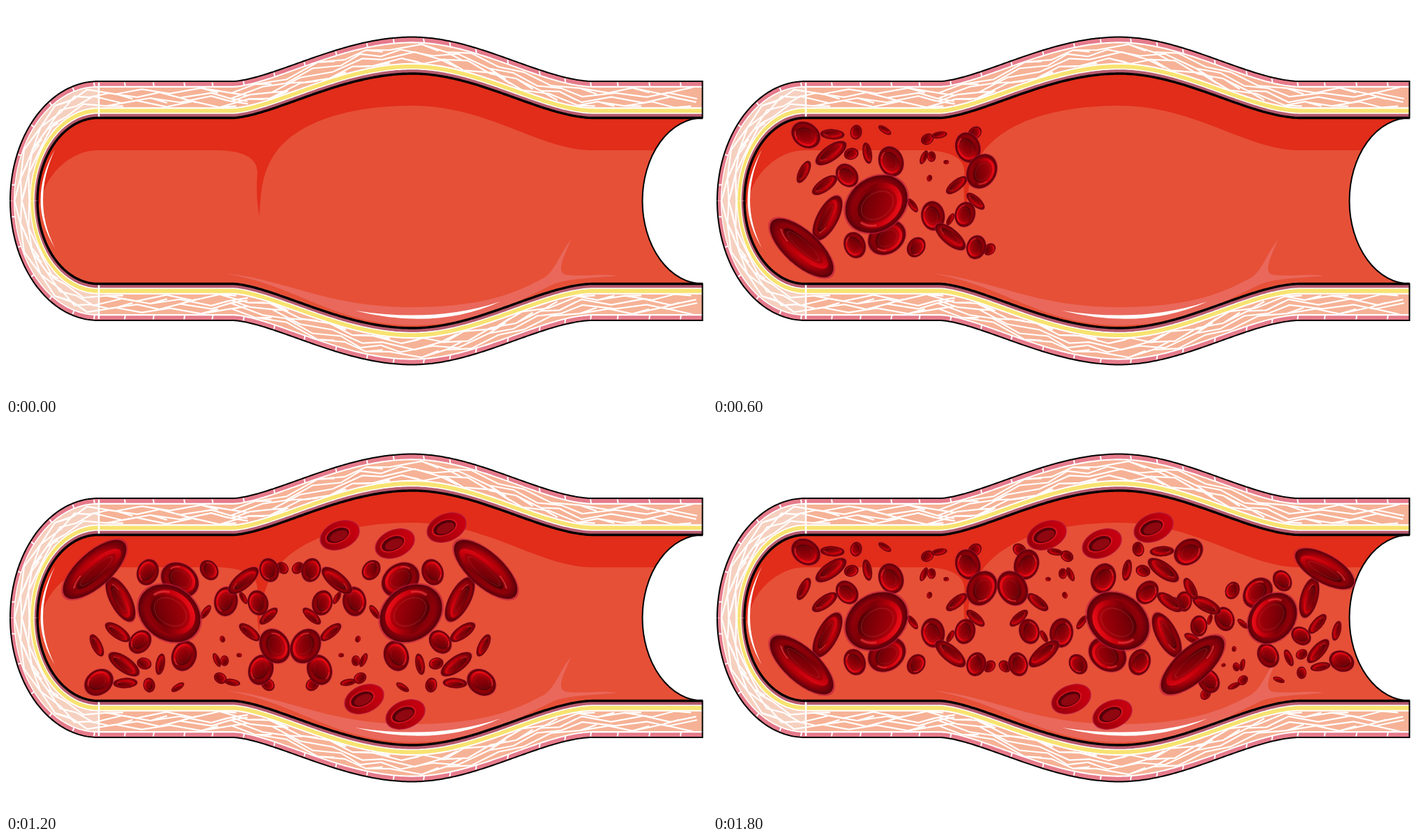
Write an HTML page with a canvas that moves like this. It is 1004 px wide and 558 px high and loops after 2400 ms.

```html
<!DOCTYPE html>
<html lang="en">
<head>
<meta charset="utf-8">
<title>Blood vessel</title>
<style>
html, body { margin: 0; width: 100%; height: 100%; overflow: hidden; background: #fff; }
canvas { display: block; }
</style>
</head>
<body>
<canvas id="stage" width="1004" height="558"></canvas>
<script>
const ctx = document.getElementById("stage").getContext("2d");
const TAU = Math.PI * 2, MID = 279.5, CAP = -103, END = 998;

let seed = 7;
const rnd = () => (seed = seed * 16807 % 2147483647) / 2147483647;

// --- vessel wall: s runs along the upper half, k from outside (0) to inside (1)
function bulge(x) {
  let u = x < 582 ? (x - 325) / 257 : (840 - x) / 258;
  if (u <= 0) return 0;
  u = Math.pow(u, x < 582 ? 0.81 : 0.9);
  return u * u * (3 - 2 * u);
}

function pt(s, k) {
  if (s >= 132) return [s, 108 + 52.5 * k - 63.5 * bulge(s)];
  const a = (132 - s) / (132 - CAP) * Math.PI / 2;
  return [132 - (126 - 39 * k) * Math.sin(a), MID - (171.5 - 52.5 * k) * Math.cos(a)];
}

function trace(k, from, to) {
  const step = from < to ? 3 : -3;
  for (let s = from; (to - s) * step > 0; s += step) ctx.lineTo(...pt(s, k));
  ctx.lineTo(...pt(to, k));
}

function band(k0, k1, color, from = CAP, to = END) {
  ctx.beginPath();
  trace(k0, from, to);
  trace(k1, to, from);
  ctx.fillStyle = color;
  ctx.fill();
}

function line(width, color, points) {
  ctx.beginPath();
  points();
  ctx.lineWidth = width;
  ctx.strokeStyle = color;
  ctx.stroke();
}

function fibres() {
  for (let j = 0; j < 4; j++) {
    line(2.2, "#fff", () => {
      let n = j;
      for (let s = CAP; s < END; s += 27 + rnd() * 20) {
        const k = 0.26 + j * 0.12 + (n++ % 2 ? 0.07 : -0.07) + (rnd() - 0.5) * 0.06;
        ctx.lineTo(...pt(s, k));
        if (rnd() < 0.4) {
          const end = pt(s + 24, Math.min(0.68, k + 0.13));
          ctx.lineTo(...end);
          ctx.moveTo(...pt(s, k));
        }
      }
    });
  }
  for (let s = CAP + 20; s < END; s += 36 + rnd() * 10)
    line(2, "#fff", () => { ctx.moveTo(...pt(s, 0.03)); ctx.lineTo(...pt(s + 1, 0.14)); });
}

function halfWall() {
  seed = 7;
  band(0, 1, "#fff");
  band(0, 0.13, "#e57b8b");
  band(0.17, 0.71, "#f6b296");
  band(0.17, 0.71, "#f6d0bf", CAP, 132);
  band(0.75, 0.86, "#f8e371");
  band(0.89, 1, "#b75a6e");
  fibres();
  line(2.5, "#fff", () => { ctx.moveTo(133, 110); ctx.lineTo(133, 159); });
  line(2, "#000", () => trace(0, CAP, END));
  line(3.4, "#000", () => trace(1, CAP, END));
  line(2, "#000", () => { ctx.moveTo(997.5, 107); ctx.lineTo(997.5, 161); });
}

function mirrored(draw) {
  draw();
  ctx.save();
  ctx.transform(1, 0, 0, -1, 0, 2 * MID);
  draw();
  ctx.restore();
}

function fillPath(d, color) {
  ctx.fillStyle = color;
  ctx.fill(new Path2D(d));
}

function vessel() {
  ctx.fillStyle = "#fff";
  ctx.fillRect(0, 0, 1004, 558);
  ctx.save();
  ctx.beginPath();
  trace(1, CAP, END);
  ctx.ellipse(END, MID, 86.5, 119, 0, -Math.PI / 2, Math.PI / 2, true);
  for (let s = END; s >= CAP; s -= 3) {
    const [x, y] = pt(s, 1);
    ctx.lineTo(x, 2 * MID - y);
  }
  ctx.clip();
  ctx.fillStyle = "#e65037";
  ctx.fillRect(0, 0, 1004, 558);
  fillPath("M40 300L52 275C58 240 95 207 130 207H300C340 207 361 218 360 240C358 268 360 285 363 301C365 270 365 242 385 212C420 162 500 143 582 143C690 143 765 207 840 207H1000V80H40Z", "#e12d1a");
  fillPath("M316 384C400 392 460 432 580 432C690 432 735 409 772 389C789 376 794 353 809 336C798 361 786 385 805 386C830 388 850 384 875 387C830 391 800 391 780 401C715 433 670 457 582 458C470 457 420 402 316 384Z", "#e9685b");
  fillPath("M500 437Q615 466 708 424Q615 455 500 437Z", "#fff");
  fillPath("M70 206Q29 280 70 347Q36 280 70 206Z", "#fff");
  ctx.restore();
  mirrored(halfWall);
  line(2, "#000", () => ctx.ellipse(END, MID, 86.5, 119, 0, Math.PI / 2, Math.PI * 1.5));
}

// --- blood cells: x, y, radius, angle in degrees
const round = [
  [133,185,23,35], [192,243,19,50], [255,223,23,70], [234,284,50,-35], [249,332,30,-35],
  [203,343,20,70], [291,346,16,-55], [315,301,22,82], [361,299,19,105], [385,237,27,-60],
  [365,203,23,70], [375,182,11,-40], [377,346,18,105], [396,349,10,-45], [307,191,10,-30],
  [313,216,8,90], [334,224,4,0], [310,247,5,110], [205,181,11,100], [198,212,11,-15]
];
const thin = [
  [171,184,18,3], [246,178,11,33], [169,211,27,-35], [221,211,16,80], [130,238,18,-63],
  [160,257,22,-35], [164,304,37,-62], [127,347,60,42], [286,286,12,55], [340,331,28,40],
  [340,306,10,-60], [376,280,17,42], [349,257,19,-38], [324,185,12,-10], [302,217,11,115]
];
const loose = [[478,161], [557,173], [631,150], [513,396], [572,418]];
const cells = [...round.map(c => [...c, 0.8]), ...thin.map(c => [...c, 0.43])]
  .sort((a, b) => a[2] - b[2]);

function disc(x, y, rx, ry, fill) {
  ctx.beginPath();
  ctx.ellipse(x, y, rx, ry, 0, 0, TAU);
  ctx.fillStyle = fill;
  ctx.fill();
}

function shade(gradient, ...colors) {
  colors.forEach((c, i) => gradient.addColorStop(i / (colors.length - 1), c));
  return gradient;
}

function place(x, y, r, deg, ratio, draw) {
  ctx.save();
  ctx.translate(x, y);
  ctx.rotate(deg * Math.PI / 180);
  ctx.scale(r, r * ratio);
  draw();
  ctx.restore();
}

function cell([x, y, r, deg, ratio]) {
  const flat = ratio < 0.5;
  place(x, y, r, deg, ratio, () => {
    disc(0, 0, 1, 1, "rgba(185,25,60,.6)");
    disc(0, 0, 0.95, 0.95, shade(ctx.createRadialGradient(0, 0, 0.4, 0, 0, 0.95),
      "#b80009", "#b00009", "#84000a", "#57000a"));
    const cy = flat ? -0.14 : 0.06;
    disc(0, cy, 0.76, flat ? 0.58 : 0.74, shade(ctx.createLinearGradient(-0.6, -0.6, 0.5, 0.7),
      "#950009", "#7b0007", "#c5000c", "#ee1019"));
    disc(0, cy, 0.61, flat ? 0.36 : 0.57, shade(ctx.createLinearGradient(-0.5, -0.4, 0.5, 0.5),
      "#480006", "#8e0009", "#b8000b"));
    disc(0, cy + 0.03, 0.46, flat ? 0.2 : 0.4, shade(ctx.createLinearGradient(-0.4, -0.4, 0.4, 0.4),
      "#650006", "#a50009"));
    if (r > 14) {
      line(0.018, "rgba(180,65,55,.55)", () => ctx.ellipse(0, cy, 0.5, flat ? 0.26 : 0.44, 0, 0, TAU));
      line(0.07, "rgba(255,70,75,.55)", () => ctx.ellipse(0, cy, 0.69, flat ? 0.47 : 0.66, 0, 2.1, 2.9));
    }
  });
}

function looseCell([x, y]) {
  place(x, y, 30, -23, 0.67, () => {
    disc(0, 0, 1, 1, "#b51737");
    disc(0, 0, 0.95, 0.95, shade(ctx.createLinearGradient(-0.9, 0, 0.9, 0),
      "#98000d", "#b2000d", "#c90010"));
    disc(-0.09, -0.05, 0.64, 0.56, "#d5121c");
    disc(-0.09, -0.05, 0.56, 0.48, "#54000a");
    disc(-0.06, 0.02, 0.45, 0.35, "#8f0710");
  });
}

function cluster(...matrix) {
  ctx.save();
  ctx.transform(...matrix);
  cells.forEach(cell);
  ctx.restore();
}

const plain = [1, 0, 0, 1, 0, 0];
const scenes = [
  [],
  [plain],
  [[1, 0, 0, -1, 0, 557], [-1, 0, 0, -1, 814, 557]],
  [[-0.807, 0.185, -0.18, -0.812, 1041, 467.3], plain, [-1, 0, 0, 1, 814, 0]]
];

let shown = -1;
function frame() {
  const now = Math.floor(performance.now() % 2400 / 600);
  if (now !== shown) {
    shown = now;
    vessel();
    scenes[now].forEach(m => cluster(...m));
    if (now > 1) loose.forEach(looseCell);
  }
  requestAnimationFrame(frame);
}
frame();
</script>
</body>
</html>
```
